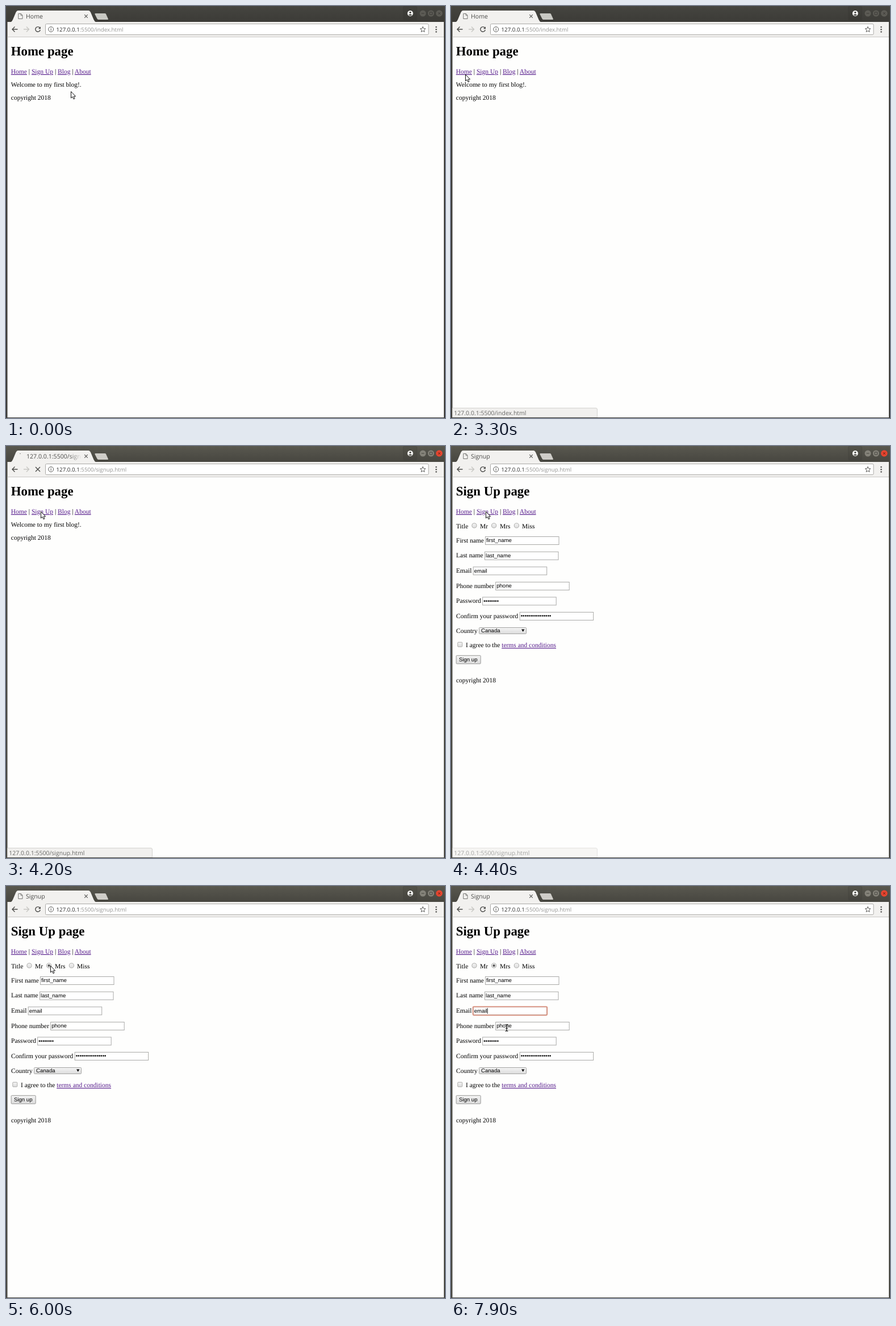
Recreate the animation shown at these times as an HTML page. Size 773 by 725 pixels, loop 8 s.

```html
<!DOCTYPE html>
<html lang="en">
<head>
<meta charset="utf-8">
<title>Browser demo</title>
<style>
html, body { margin: 0; width: 100%; height: 100%; overflow: hidden; background: #fefefd; }
svg { display: block; width: 773px; height: 725px; }
text { white-space: pre; text-rendering: geometricPrecision; }
.page { font: 11.5px "Liberation Serif", "Times New Roman", serif; }
.h1 { font: bold 22.9px "Liberation Serif", "Times New Roman", serif; }
.form { font: 9.6px "Liberation Sans", Arial, sans-serif; }
.ui { font: 10.6px "Open Sans", "Noto Sans", sans-serif; fill: #4b4b49; }
.url { font-size: 9.75px; }
.link { fill: #551a8b; text-decoration: underline; }
</style>
</head>
<body>
<svg id="stage" viewBox="0 0 773 725"></svg>
<script>
const LOOP = 8000, STEP = 100;
const stage = document.getElementById('stage');

// Pointer glides: first step, last step, end x, end y, shape
const moves = [
  [800, 1100, 49, 124, 'arrow'],
  [1300, 1300, 36.5, 122, 'arrow'],
  [1500, 1600, 19, 114, 'hand'],
  [3300, 3300, 25, 120, 'arrow'],
  [3400, 3500, 42, 120, 'arrow'],
  [3600, 3800, 62, 115, 'hand'],
  [4200, 4200, 61, 115, 'arrow'],
  [4700, 5000, 62, 120, 'arrow'],
  [5100, 5500, 77, 139, 'arrow'],
  [5700, 5700, 78, 140, 'arrow'],
  [6400, 6500, 81, 155, 'arrow'],
  [6600, 6700, 90, 197, 'beam'],
  [7100, 7200, 92, 206, 'beam'],
  [7400, 7500, 94, 225, 'beam'],
  [7700, 7900, 98, 249.5, 'beam']
];

const shapes = {
  arrow: '<path d="M.5 .5V12L3.2 9.6 5 13.8 7 13 5.2 9H8.6Z" fill="#fff" stroke="#111"/>',
  hand: `<path d="M-1 1.2Q0 -.3 1.2 1.2V5L7 6Q8.4 6.4 8.3 8V10L7 13.4H0L-3.6 9.2Q-4 7.4 -2.4 7.6L-1 8.6Z"
    fill="#fff" stroke="#111"/><path d="M3 5.4V7.5M5.3 5.8V7.8" stroke="#111" stroke-width=".8"/>`,
  beam: `<path d="M-2.5 -6Q-.3 -6 0 -4.8Q.3 -6 2.5 -6M0 -4.8V4.8M-2.5 6Q-.3 6 0 4.8Q.3 6 2.5 6M-2 1H2"
    fill="none" stroke="#111" stroke-width="1.2"/>`
};

const text = (x, y, s, cls = 'page', extra = '') => `<text x="${x}" y="${y}" class="${cls}" ${extra}>${s}</text>`;
const rect = (x, y, w, h, fill, extra = '') =>
  `<rect x="${x}" y="${y}" width="${w}" height="${h}" fill="${fill}" ${extra}/>`;
const circle = (x, y, r, fill, extra = '') => `<circle cx="${x}" cy="${y}" r="${r}" fill="${fill}" ${extra}/>`;
const line = (d, color, width = 1.2) => `<path d="${d}" fill="none" stroke="${color}" stroke-width="${width}"/>`;
const link = s => `<tspan class="link">${s}</tspan>`;
const gradient = (id, a, b) => `<linearGradient id="${id}" x2="0" y2="1"><stop stop-color="${a}"/>
  <stop offset="1" stop-color="${b}"/></linearGradient>`;

function pointer(t) {
  let x = 114, y = 150, kind = 'arrow';
  for (const [from, to, ex, ey, shape] of moves) {
    if (t < from) break;
    const p = Math.min(1, (t - from + STEP) / (to - from + STEP));
    x += (ex - x) * p;
    y += (ey - y) * p;
    kind = shape;
  }
  return `<g transform="translate(${x} ${y})">${shapes[kind]}</g>`;
}

function windowFrame(focused) {
  const dark = focused ? '#474640' : '#3c3b37';
  const glyph = focused ? '#45443f' : '#3c3b37';
  const button = focused ? '#85837a' : '#5c5b55';
  return `<defs>${gradient('bar', focused ? '#59584f' : '#454540', dark)}
    ${gradient('grey', '#f4f4f4', '#dcdcdc')}
    <linearGradient id="fade" gradientUnits="userSpaceOnUse" x1="112" x2="133">
      <stop stop-color="#4b4b49"/><stop offset="1" stop-color="#4b4b49" stop-opacity="0"/></linearGradient></defs>`
    + rect(0, 0, 773, 725, dark) + rect(0, 0, 773, 28, 'url(#bar)')
    + rect(2.5, 54, 768.5, 670, '#fefefd')
    + rect(2.5, 28, 768.5, 26, '#f2f1ef') + rect(2.5, 54, 768.5, 1, '#c9c8c5')
    + '<path d="M8 28.5Q10.5 27.5 12 24L17.5 11Q19 8 21 8H145.500Q147.500 8 149 11L154.500 24Q156 27.500 158.500 28.500Z" fill="#f2f1ef"/>'
    + `<path d="M157.500 13H174Q175.500 13 176 14L180 23Q180 24 179 24H163Q161.500 24 160.500 22.500L156.500 14.500Q156 13 157.500 13Z"
      fill="${focused ? '#cfcdc8' : '#c8c8c3'}"/>`
    + line('M138.2 15.2l5.600 5.600m0 -5.600l-5.600 5.600', '#5d5d5b')
    + rect(699.5, .5, 24, 25, '#000', `fill-opacity=".06" stroke="${dark}" stroke-opacity=".6" rx="2"`)
    + circle(711.800, 13, 5, '#f7f7f5') + circle(711.800, 11.300, 1.600, dark)
    + `<path d="M708.600 15.800Q711.800 12.800 715 15.800Q711.800 18 708.600 15.800Z" fill="${dark}"/>`
    + circle(734, 13, 5.5, button) + circle(748.300, 13, 5.5, button)
    + circle(762.800, 13, 5.800, focused ? '#e5452f' : button)
    + line('M731.500 13h5', glyph, 1) + line('M746 10.800h4.600v4.400h-4.600z', glyph, 1)
    + line('M760.800 11l4 4m0 -4l-4 4', focused ? '#6d2118' : glyph, 1);
}

function toolbar(file, loading) {
  const ink = '#4b4b49';
  return line('M20.500 41H11.500M15.500 36.500L11 41L15.500 45.500', ink, 1.4)
    + line('M31 41H40M36 36.500L40.500 41L36 45.500', '#c7c6c3', 1.4)
    + (loading ? line('M52 37l8 8m0 -8l-8 8', ink, 1.4)
      : line('M59.500 38.300A4.300 4.300 0 1 0 60.300 42', ink, 1.4) + `<path d="M61 36.200V40.300H56.900Z" fill="${ink}"/>`)
    + rect(69.5, 31.5, 674.5, 19, '#fff', 'rx="2" stroke="#aaa9a6"')
    + circle(79.200, 41, 4.500, 'none', 'stroke="#5d5d5b"') + line('M79.200 40.300V43.600M79.200 38.300V39.400', '#5d5d5b', 1.1)
    + text(88.5, 44.7, `127.0.0.1<tspan fill="#969694">:5500/${file}</tspan>`, 'ui url', 'style="fill:#2f2f2e"')
    + line('M734 36.300L735.300 39.600L738.800 39.900L736.100 42.200L736.900 45.600L734 43.800L731.100 45.600L731.900 42.200L729.200 39.900L732.700 39.600Z', '#5d5d5b', 1)
    + [37, 41.2, 45.4].map(y => circle(757.5, y, 1.25, ink)).join('');
}

function tab(title, loading) {
  if (loading) return rect(24, 13, 2, 1, '#8c8c8a')
    + text(36, 21.8, '127.0.0.1:5500/sign', 'ui', 'style="fill:url(#fade)"');
  return line('M21.800 13.500H26.300L29 16.200V22.500H21.800ZM26.100 13.500V16.400H29', '#6a6a68', .9)
    + text(35, 21.8, title, 'ui');
}

function field(label, x, y, value, focused, caret) {
  return text(9, y + 10.7, label)
    + rect(x + .5, y + .5, 129.5, 14, '#fff', 'stroke="#a9a9a7"')
    + (focused ? rect(x, y, 130.5, 15, 'none', 'rx="1.500" stroke="#d88d7a" stroke-width="1.800"')
      + rect(x + caret, y + 2.5, 1, 10, '#222') : '')
    + text(x + 2, y + 10.3, value, 'form');
}

function signup(t) {
  const radio = (x, label, lx) => circle(x, 140, 4.1, 'url(#grey)', 'stroke="#a4a4a2" stroke-width=".9"')
    + text(lx, 145, label);
  return text(9, 145, 'Title') + radio(41, 'Mr', 51) + radio(75.6, 'Mrs', 86) + radio(115.4, 'Miss', 125)
    + (t >= 5900 ? circle(75.6, 140, 2.1, '#555') : '')
    + field('First name', 60, 159, 'first_name')
    + field('Last name', 59, 185.7, 'last_name', t >= 6900 && t < 7500, 32)
    + field('Email', 38.700, 212.3, 'email', t >= 7500, 25)
    + field('Phone number', 78.2, 239, 'phone')
    + field('Password', 55.2, 265.5, '•'.repeat(8))
    + field('Confirm your password', 120.7, 292, '•'.repeat(16))
    + text(9, 328.5, 'Country')
    + rect(49.5, 319.5, 83, 11, 'url(#grey)', 'stroke="#a4a4a2" rx="1"')
    + text(53, 328.3, 'Canada', 'form') + '<path d="M124 322.500H129.500L126.750 327Z" fill="#111"/>'
    + rect(11.8, 345.3, 8, 8, 'url(#grey)', 'stroke="#a4a4a2" stroke-width=".9" rx="1"')
    + text(26, 354.3, 'I agree to the ' + link('terms and conditions'))
    + rect(9.2, 368.7, 43, 14.5, 'url(#grey)', 'stroke="#999997" rx="1"')
    + text(14, 379.2, 'Sign up', 'form')
    + text(9, 415.5, 'copyright 2018');
}

function status(t) {
  const alpha = t < 1800 ? 0 : t < 2200 ? (t - 1700) / 400
    : t < 4400 ? 1 : t < 4500 ? .6 : t < 4700 ? .25 : 0;
  const file = t < 3600 ? 'index' : 'signup';
  return `<g opacity="${alpha}"><path d="M2.500 707.500H255Q257.500 707.500 257.500 710V724H2.500Z" fill="#f1f0ee" stroke="#d3d2d0"/>
    ${text(5.3, 719.5, `127.0.0.1:5500/${file}.html`, 'ui', 'style="font-size:10.5px;fill:#686866"')}</g>`;
}

function render(t) {
  const loaded = t >= 4400, loading = t >= 4100 && !loaded;
  stage.innerHTML = windowFrame(t >= 4000)
    + tab(loaded ? 'Signup' : 'Home', loading)
    + toolbar(t >= 4100 ? 'signup.html' : 'index.html', loading)
    + text(8.7, 87.2, loaded ? 'Sign Up page' : 'Home page', 'h1')
    + text(8.8, 119, ['Home', 'Sign Up', 'Blog', 'About'].map(link).join(' | '))
    + (loaded ? signup(t) : text(8.8, 142, 'Welcome to my first blog!.') + text(8.8, 165, 'copyright 2018'))
    + status(t) + rect(0, 724, 773, 1, t >= 4000 ? '#474640' : '#3c3b37')
    + pointer(t);
}

let shown = -1;
const start = performance.now();
function tick() {
  const t = Math.floor((performance.now() - start) % LOOP / STEP) * STEP;
  if (t !== shown) render(shown = t);
  requestAnimationFrame(tick);
}
tick();
</script>
</body>
</html>
```
